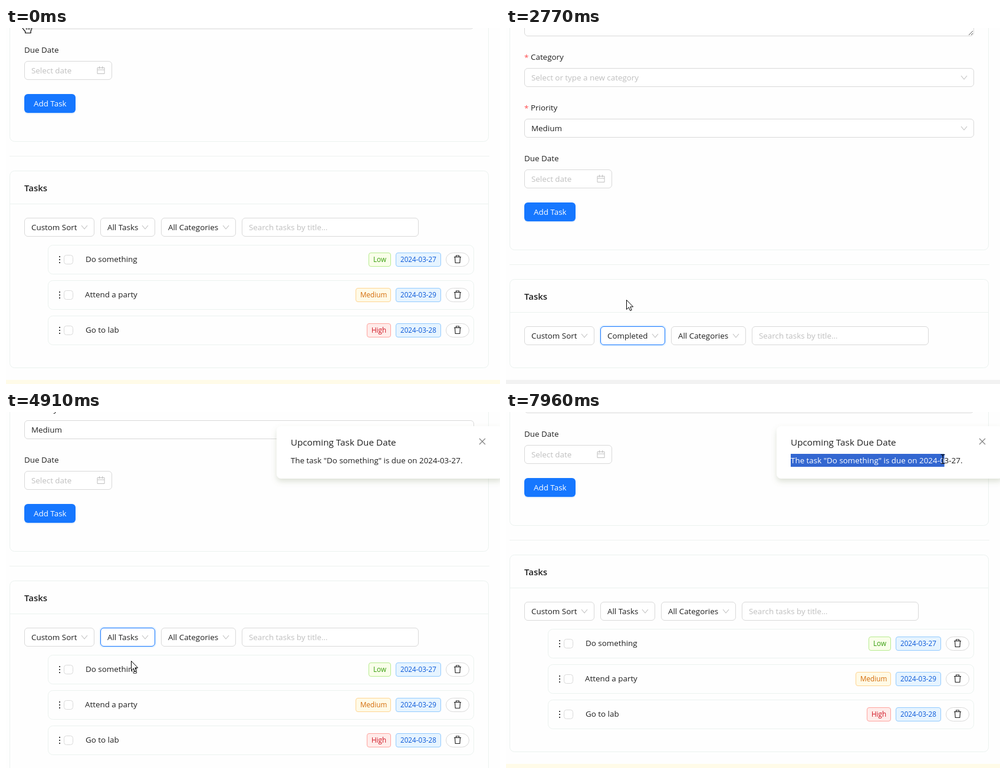
An HTML page that plays this animation: 838x604 px, repeating every 8000 ms.

```html
<!DOCTYPE html>
<html lang="en">
<head>
<meta charset="utf-8">
<title>Task list</title>
<style>
  html, body { margin: 0; width: 100%; height: 100%; overflow: hidden; background: #fefefe; }
  svg { display: block; width: 838px; height: 604px; }
  text { font-family: "Open Sans", "Noto Sans", sans-serif; white-space: pre; }
</style>
</head>
<body>
<svg id="stage" viewBox="0 0 838 604" xmlns="http://www.w3.org/2000/svg"></svg>
<script>
const LOOP = 8000, TICK = 89.4;
const BODY = 13.4, HEADING = 15.3, TAG = 11.7;
const INK = '#1f1f1f', FAINT = '#bfbfbf', LINE = '#d9d9d9', EDGE = '#ebf2ef', BLUE = '#1677ff';
const NOTE = 'The task "Do something" is due on 2024-03-27.';
const FULL_SCROLL = 184;
const stage = document.getElementById('stage');
const pen = document.createElement('canvas').getContext('2d');

// Cursor path: tick, x, y, shape
const PATH = [
  [0, 33, -15, 'hand'], [1, 48, 12, 'arrow'], [8, 190, 310, 'arrow'], [10, 214, 338, 'hand'],
  [12, 217, 342, 'hand'], [14, 221, 373, 'hand'], [18, 190, 407, 'hand'], [21, 190, 407, 'arrow'],
  [30, 190, 407, 'arrow'], [31, 204, 461, 'arrow'], [33, 212, 514, 'hand'], [37, 212, 514, 'hand'],
  [43, 214, 435, 'hand'], [44, 214, 435, 'hand'], [46, 212, 422, 'hand'], [48, 212, 422, 'arrow'],
  [60, 212, 422, 'arrow'], [61, 306, 345, 'hand'], [62, 345, 310, 'arrow'], [70, 600, 78, 'arrow'],
  [71, 570, 82, 'beam'], [72, 541, 82, 'beam'], [73, 541, 82, 'beam'], [76, 508, 79, 'beam'],
  [78, 486, 79, 'beam'], [80, 486, 79, 'beam'], [88, 610, 80, 'beam'], [89, 741, 80, 'beam']
];

const SHAPES = {
  arrow: '<path d="M.5.5V16.5L4.2 13l2.5 5.6 2.5-1.1L6.8 12H11.7Z" fill="#fff" stroke="#000"/>',
  hand: '<path d="M-2 2C-2-.2 1.5-.2 1.5 2V8q0-1.5 1.5-1.5T4.8 8q0-1.2 1.4-1.2T8 8.5q.3-1 1.3-.8t1.4 2V15q0 3-1.7 5v3.5H-.3V21Q-6 14.5-6 12.5t2-2 2 1.5Z" fill="#fff" stroke="#000" stroke-width="1.2"/><path d="M1.5 13v5M4.5 13v5M7.3 13v5" stroke="#000"/>',
  beam: '<path d="M-3.5-7.5H-1L0-6.5 1-7.5H3.5M0-6.5V6.5M-3.5 7.5H-1L0 6.5 1 7.5H3.5" fill="none" stroke="#000" stroke-width="1.2"/>'
};

const TASKS = [
  ['Do something', 135, 'Low', 615, '#f9fee9', '#b7eb8f', '#389e0d'],
  ['Attend a party', 134, 'Medium', 593, '#fffae6', '#ffd591', '#d46b08'],
  ['Go to lab', 135, 'High', 612, '#ffecea', '#ffa39e', '#cf1322']
];
const DATES = ['2024-03-27', '2024-03-29', '2024-03-28'];

const text = (x, y, s, fill = INK, size = BODY, weight = 400) =>
  `<text x="${x}" y="${y}" fill="${fill}" font-size="${size}" font-weight="${weight}">${s}</text>`;
const box = (x, y, w, h, r, fill = '#fff', stroke = LINE, extra = '') =>
  `<rect x="${x + .5}" y="${y + .5}" width="${w - 1}" height="${h - 1}" rx="${r}" fill="${fill}" stroke="${stroke}" ${extra}/>`;
const fillBox = (x, y, w, h, r, fill) =>
  `<rect x="${x}" y="${y}" width="${w}" height="${h}" rx="${r}" fill="${fill}"/>`;
const strokePath = (d, color, width = 1) =>
  `<path d="${d}" fill="none" stroke="${color}" stroke-width="${width}"/>`;
const chevron = (x, y) => strokePath(`M${x - 5} ${y - 3}l5 6 5-6`, FAINT, 1.1);
const group = (content, attrs) => `<g ${attrs}>${content}</g>`;

function select(x, y, w, label, color = INK, focused = false) {
  const ring = focused ? fillBox(x - 2, y - 2, w + 4, 36, 8, '#e3f2ff') : '';
  return ring + box(x, y, w, 32, 5.5, '#fff', focused ? BLUE : LINE) +
    text(x + 12, y + 21, label, color) + chevron(x + w - 17, y + 16);
}

function form() {
  const required = (y, label) => text(31, y + 1, '*', '#ff4d4f') + text(42, y, label);
  return box(6, -60, 813, 437, 8, '#fefefe', EDGE) +
    box(31, -60, 763, 74, 5.5) + strokePath('M785 12l7-7M789 12l3-3', '#555') +
    required(54, 'Category') + select(31, 68, 763, 'Select or type a new category', FAINT) +
    required(140, 'Priority') + select(31, 154, 763, 'Medium') +
    text(31, 226, 'Due Date') + box(31, 240, 149, 32, 5.5) + text(43, 261, 'Select date', FAINT) +
    strokePath('M155 251.5h12v10h-12zM155 255h12M158.5 249v4M163.5 249v4', FAINT) +
    fillBox(31, 297, 87, 33, 6, '#e6f0fc') + fillBox(31, 296, 87, 32, 6, BLUE) +
    text(47, 317, 'Add Task', '#fff') +
    strokePath('M6 401.5H820', '#edf1ef');
}

function tag(x, y, w, label, fill, stroke, color) {
  return box(x, y, w, 24, 3.5, fill, stroke) + text(x + 8, y + 16, label, color, TAG);
}

function taskRow([title, x, level, tagX, fill, stroke, color], i, hover) {
  const y = 552 + 60 * i;
  const dots = [20, 25, 30].map(d => fillBox(90, y + d - 1, 2, 2, .5, '#333')).join('');
  const trash = strokePath(`M760 ${y + 20.5}h12M763.5 ${y + 20}v-2h5v2M761.5 ${y + 21}l.7 9.5h7.6l.7-9.5`, INK, 1.15);
  const card = hover
    ? fillBox(71, y + 6, 723, 45, 8, '#dcdedb') + fillBox(71, y, 723, 49.5, 8, '#fefefe')
    : box(71, y, 723, 50, 8, '#fefefe', EDGE);
  return card + dots + box(98, y + 17, 16, 16, 4) + text(x, y + 29, title) +
    tag(tagX, y + 13, 653 - tagX, level, fill, stroke, color) +
    tag(661, y + 13, 77, DATES[i], '#e6f4ff', '#91caff', '#0958d9') +
    box(746, y + 13, 40, 24, 12) + trash;
}

function taskPanel(n, filtered, open) {
  const shift = filtered ? 17 : 0;
  const height = filtered ? 151 : 335;
  const rows = filtered ? '' : TASKS.map((task, i) => taskRow(task, i, i === 0 && n === 61)).join('');
  return box(6, 426, 813, height, 8, '#fefefe', EDGE) +
    strokePath('M7 482.5H818', EDGE) + text(31, 461, 'Tasks', INK, 15, 600) +
    select(31, 506, 119, 'Custom Sort') +
    select(160, 506, 93 + shift, filtered ? 'Completed' : 'All Tasks', open ? FAINT : INK, n >= 11 && n < 80) +
    select(263 + shift, 506, 127, 'All Categories') +
    box(400 + shift, 506, 300, 32, 5.5) + text(412 + shift, 527, 'Search tasks by title...', FAINT) +
    rows + fillBox(0, 446 + height, 838, 30, 0, filtered ? '#f2f2f2' : '#fffbe8');
}

function menu(y, w, opacity, selected, pointerY) {
  const labels = w < 100 ? ['All Tasks', 'Comple...', 'Incompl...'] : ['All Tasks', 'Completed', 'Incomplete'];
  const items = labels.map((label, i) => {
    const top = y + 4 + 32 * i;
    const hovered = pointerY >= top && pointerY < top + 32;
    const fill = i === selected ? '#e6f4ff' : hovered ? '#f5f5f5' : '#fff';
    return fillBox(164, top, w - 8, 32, 4, fill) +
      text(176, top + 21, label, INK, BODY, i === selected ? 600 : 400);
  }).join('');
  return group(group(fillBox(160, y, w, 104, 8, '#fff'), 'filter="url(#shadow)"') + items, `opacity="${opacity}"`);
}

function notice(n, pointerX) {
  const offset = { 48: 384, 49: 230, 50: 70 }[n] || 0;
  let out = group(fillBox(459, 24, 384, 89, 8, '#fff'), 'filter="url(#shadow)"') +
    text(483, 57, 'Upcoming Task Due Date', INK, HEADING) + text(483, 87, NOTE) +
    strokePath('M803 45l10 10M813 45l-10 10', '#858585', 1.3);
  if (n > 80) {
    pen.font = `${BODY}px "Open Sans", "Noto Sans", sans-serif`;
    const widthOf = count => pen.measureText(NOTE.slice(0, count)).width;
    let count = 0;
    while (count < NOTE.length && 483 + (widthOf(count) + widthOf(count + 1)) / 2 < pointerX) count++;
    out += fillBox(483, 71, widthOf(count), 22, 0, '#3367d1') + text(483, 87, NOTE.slice(0, count), '#fff');
  }
  return group(out, `transform="translate(${offset})"`);
}

function cursorAt(n) {
  const i = PATH.findLastIndex(key => key[0] <= n);
  const [from, x, y, shape] = PATH[i];
  const next = PATH[i + 1] || PATH[i];
  const p = next[0] > from ? (n - from) / (next[0] - from) : 0;
  return { x: Math.round(x + (next[1] - x) * p), y: Math.round(y + (next[2] - y) * p), shape };
}

function scrollAt(n) {
  if (n < 21 || n > 55) return FULL_SCROLL;
  return { 54: 50, 55: 140 }[n] || 0;
}

const SHADOW = `<defs><filter id="shadow" x="-30%" y="-30%" width="160%" height="170%">
  <feDropShadow dx="0" dy="5" stdDeviation="5" flood-color="#7c8c60" flood-opacity=".25"/></filter></defs>`;

function render(n) {
  const cursor = cursorAt(n), scroll = scrollAt(n);
  const filtered = n >= 21 && n < 48;
  const open = (n >= 12 && n < 21) || (n >= 35 && n < 48);
  const pointerY = cursor.y + scroll;
  const fade = { 12: .6, 21: .5, 22: .2, 35: .6, 48: .5, 49: .2 }[n] || 1;
  let page = form() + taskPanel(n, filtered, open);
  if (n >= 12 && n <= 22) page += menu(542, 93, fade, n < 21 ? 0 : 1, pointerY);
  if (n >= 35 && n <= 49) page += menu(398, 110, fade, n < 48 ? 1 : 0, pointerY);
  stage.innerHTML = SHADOW + fillBox(0, 0, 838, 604, 0, '#fefefe') +
    group(page, `transform="translate(0 ${-scroll})"`) +
    (n >= 48 ? notice(n, cursor.x) : '') +
    group(SHAPES[cursor.shape], `transform="translate(${cursor.x} ${cursor.y})"`);
}

let shown = -1;
function frame() {
  const n = Math.floor((performance.now() % LOOP + 10) / TICK);
  if (n !== shown) render(shown = n);
  requestAnimationFrame(frame);
}
frame();
</script>
</body>
</html>
```
